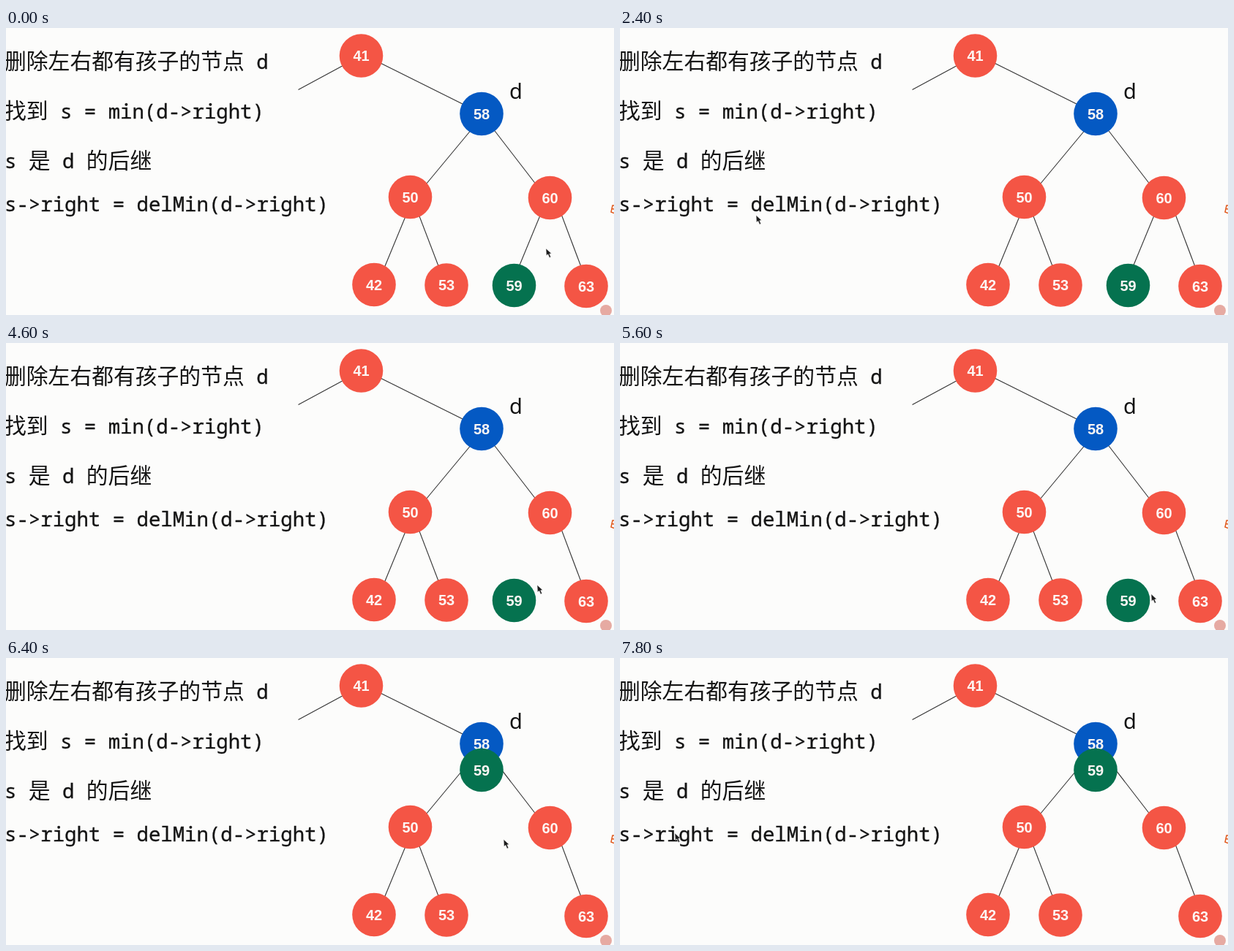
Write an HTML page that moves like this. It is 831x393 px and loops after 8 s.

```html
<!DOCTYPE html>
<html lang="zh">
<head>
<meta charset="utf-8">
<title>Deleting a tree node</title>
<style>
  html, body { margin: 0; width: 100%; height: 100%; overflow: hidden; background: #fcfcfb; }
  svg { display: block; }
  .note { font: 29.8px "Noto Sans CJK SC", "Noto Sans CJK", "Noto Sans CJK JP", sans-serif; fill: #141414; }
  .code { font: 27.35px "Noto Sans Mono", "DejaVu Sans Mono", monospace; stroke: #141414; stroke-width: .3; }
  .label { font: 29px "Noto Sans", "Open Sans", sans-serif; fill: #111; text-anchor: middle; }
  .node text { font: bold 20px "Liberation Sans", Arial, sans-serif; fill: #fdf6f4; text-anchor: middle; }
  .edge { stroke: #333; stroke-width: 1.1; }
</style>
</head>
<body>
<svg width="831" height="393" viewBox="0 0 831 393">
  <g class="note">
    <text x="-2" y="56">删除左右都有孩子的节点<tspan class="code"> d</tspan></text>
    <text x="-2" y="124.4">找到<tspan class="code"> s = min(d-&gt;right)</tspan></text>
    <text x="-2" y="192">
      <tspan class="code">s </tspan>是<tspan class="code"> d </tspan>的后继</text>
    <text x="-2" y="250.5" class="code">s-&gt;right = delMin(d-&gt;right)</text>
  </g>
  <text class="label" x="697" y="96.5">d</text>
  <path d="M831 243h-2l-2 9 4 1.5M828 247.5l3 .6" fill="none" stroke="#e0581c" stroke-width="1.5"/>
  <g id="edges"></g>
  <g id="nodes"></g>
  <circle cx="820" cy="387" r="8" fill="#e6aaa2"/>
  <path id="cursor" d="M0 0L.6 9.6 2.8 7.8 4.8 12.4 6.6 11.6 4.7 7.2 7.4 6.8Z"
        fill="#1c1c1c" stroke="#fff" stroke-opacity=".7" stroke-width=".6"/>
</svg>
<script>
  const LOOP = 8000, STEP = 100, CUT_AT = 4300;
  const RED = '#f45545', BLUE = '#0459c3', GREEN = '#05724f';

  const byId = id => document.getElementById(id);
  const add = (parent, tag, attrs, text = '') => {
    const el = document.createElementNS('http://www.w3.org/2000/svg', tag);
    for (const key in attrs) el.setAttribute(key, attrs[key]);
    el.textContent = text;
    return parent.appendChild(el);
  };
  const place = (el, { x, y }) => el.setAttribute('transform', `translate(${x} ${y})`);

  const addNode = (value, x, y, fill = RED) => {
    const el = add(byId('nodes'), 'g', { class: 'node' });
    add(el, 'circle', { r: 29.8, fill });
    add(el, 'text', { y: 7 }, value);
    const node = { el, x, y };
    place(el, node);
    return node;
  };
  // Edges run between centres, each end nudged sideways.
  const link = (a, b, nudgeA = 0, nudgeB = 0) => add(byId('edges'), 'line', {
    class: 'edge', x1: a.x + nudgeA, y1: a.y, x2: b.x + nudgeB, y2: b.y
  });

  const root = addNode(41, 485.5, 38);
  const doomed = addNode(58, 650, 117.5, BLUE);
  const left = addNode(50, 552.5, 231.5);
  const right = addNode(60, 743.5, 232.5);
  const leftMin = addNode(42, 503, 351.5);
  const leftMax = addNode(53, 602, 352);
  const rightMax = addNode(63, 793, 353.5);
  const successor = addNode(59, 694.5, 352.5, GREEN);

  link(root, { x: 399.5, y: 84.5 });
  link(root, doomed, 6, 1);
  link(doomed, left, 4, 7);
  link(doomed, right, 0, -5);
  link(left, leftMin, 4.5, 4.5);
  link(left, leftMax, 2.5, -1);
  link(right, rightMax, 7, 3);
  const cutEdge = link(right, successor, -3.5, -4);

  const move = (start, end, x, y) => ({ start, end, x, y });
  const cursorStart = { x: 738, y: 302 };
  const cursorMoves = [
    move(500, 1400, 235, 290),
    move(1400, 1700, 186, 256.5),
    move(3200, 3800, 46, 221),
    move(3800, 4100, 33, 218),
    move(4100, 4600, 726, 331.5),
    move(5200, 5800, 726, 350),
    move(6100, 6200, 694.5, 266.5),
    move(6200, 7000, 637, 194.5),
    move(7000, 7800, 75, 240)
  ];
  const successorMoves = [
    move(6100, 6200, 655.5, 178.5),
    move(6200, 6400, doomed.x, 153.5)
  ];

  const positionAt = (from, moves, t) => moves.reduce((p, m) => {
    const k = Math.min(1, Math.max(0, (t - m.start) / (m.end - m.start)));
    return { x: p.x + (m.x - p.x) * k, y: p.y + (m.y - p.y) * k };
  }, from);

  const draw = time => {
    const t = Math.floor((time % LOOP) / STEP) * STEP;
    place(byId('cursor'), positionAt(cursorStart, cursorMoves, t));
    place(successor.el, positionAt(successor, successorMoves, t));
    cutEdge.setAttribute('visibility', t < CUT_AT ? 'visible' : 'hidden');
  };

  const start = performance.now();
  const tick = () => {
    draw(performance.now() - start);
    requestAnimationFrame(tick);
  };
  tick();
</script>
</body>
</html>
```
